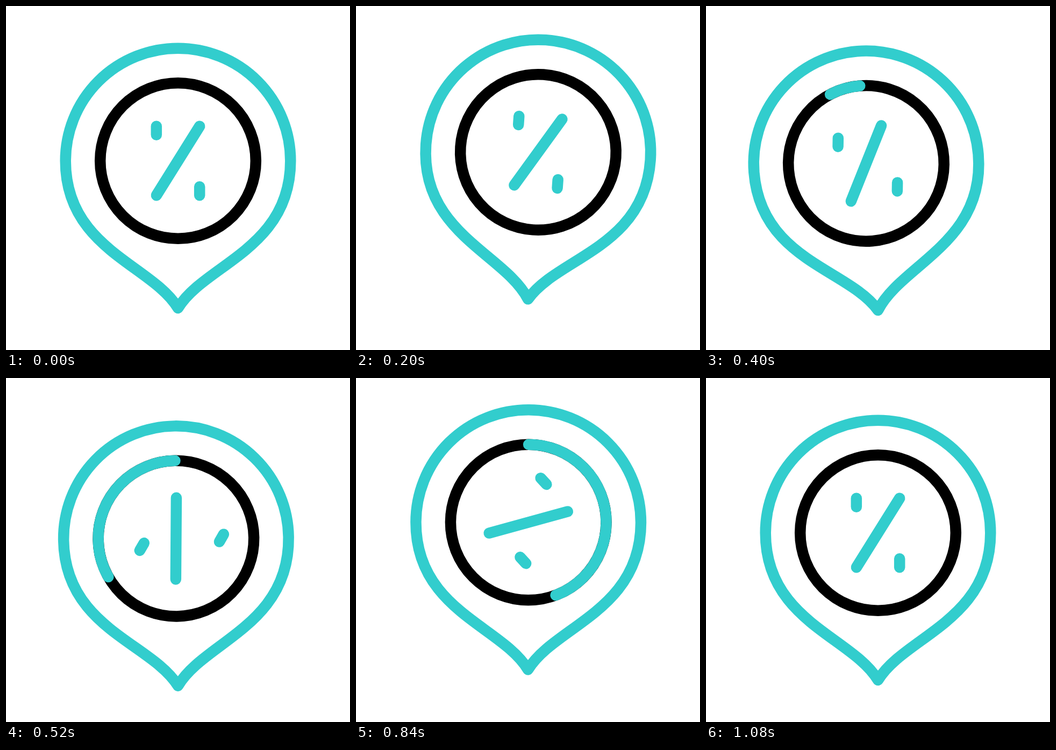
These frames come from a looping animation (640 by 640 pixels, 1480 ms). An HTML page with a canvas:

```html
<!DOCTYPE html>
<html>
<head>
<meta charset="utf-8">
<style>
html, body { margin: 0; width: 100%; height: 100%; overflow: hidden; background: #fff; }
canvas { display: block; }
</style>
</head>
<body>
<canvas id="stage" width="640" height="640"></canvas>
<script>
const ctx = document.getElementById('stage').getContext('2d');
const TEAL = '#32cdcd', LOOP = 1480, STEP = 40, DEG = Math.PI / 180;
const HEAD = 209.3, RING = 144.8, HEIGHT = 274; // pin radius, ring radius, centre to tip
const ORBIT = 69.2, SLANT = 54.5; // dot distance and angle from the centre

// Smooth progress from 0 to 1 between two times.
function ramp(t, from, to) {
  const u = Math.min(1, Math.max(0, (t - from) / (to - from)));
  return u * u * (3 - 2 * u);
}

function stroke(color, draw) {
  ctx.strokeStyle = color;
  ctx.beginPath();
  draw();
  ctx.stroke();
}

// Upright bar, turned about its middle.
function bar(x, y, half, angle) {
  turned(x, y, angle, () => stroke(TEAL, () => {
    ctx.moveTo(0, -half);
    ctx.lineTo(0, half);
  }));
}

function turned(x, y, angle, draw) {
  ctx.save();
  ctx.translate(x, y);
  ctx.rotate(angle * DEG);
  draw();
  ctx.restore();
}

// Pin outline around its head centre.
function pin() {
  ctx.arc(0, 0, HEAD, Math.PI, 0);
  ctx.bezierCurveTo(HEAD, 164, 49, 193, 0, HEIGHT);
  ctx.bezierCurveTo(-49, 193, -HEAD, 164, -HEAD, 0);
  ctx.closePath();
}

// The two dots trade places on a path that swells and drifts on the way.
function dots(turn, spin) {
  const swell = Math.sin(turn * DEG), lean = (turn - 20) * DEG;
  const radius = ORBIT + 9.5 * swell * Math.sin(lean);
  for (const side of [0, 180]) {
    const angle = (SLANT - turn + side) * DEG;
    bar(12 * swell + radius * Math.cos(angle),
        11 * swell * Math.cos(lean) + radius * Math.sin(angle), 8, spin);
  }
}

function render(t) {
  const lift = -19.5 * ramp(t, 40, 250) + 31.5 * ramp(t, 250, 474)
    - 31.5 * ramp(t, 474, 840) + 19.5 * ramp(t, 840, 1080);
  const sway = 5 * ramp(t, 40, 160) - 10 * ramp(t, 160, 360)
    + 7 * ramp(t, 360, 640) - 2 * ramp(t, 640, 880);
  const spin = 180 * ramp(t, 320, 1080);
  const turn = 103 * ramp(t, 320, 680) + 77 * ramp(t, 680, 1080);
  const head = 360 * ramp(t, 320, 840);
  const tail = 360 * ramp(t, 560, 1080);

  ctx.fillStyle = '#fff';
  ctx.fillRect(0, 0, 640, 640);
  ctx.lineWidth = 20.5;
  ctx.lineCap = ctx.lineJoin = 'round';

  // Everything sways about the tip of the pin.
  turned(320, 562 + lift, sway, () => {
    ctx.translate(0, -HEIGHT);
    stroke(TEAL, pin);
    stroke('#000', () => ctx.arc(0, 0, RING, 0, 2 * Math.PI));
    if (head > tail) {
      stroke(TEAL, () => ctx.arc(0, 0, RING, (-90 - tail) * DEG, (-90 - head) * DEG, true));
    }
    bar(0, 0, 75.8, 32 - spin);
    dots(turn, spin);
  });
}

const start = performance.now();
function tick() {
  const t = (performance.now() - start) % LOOP;
  render(Math.floor(t / STEP) * STEP);
  requestAnimationFrame(tick);
}
tick();
</script>
</body>
</html>
```
